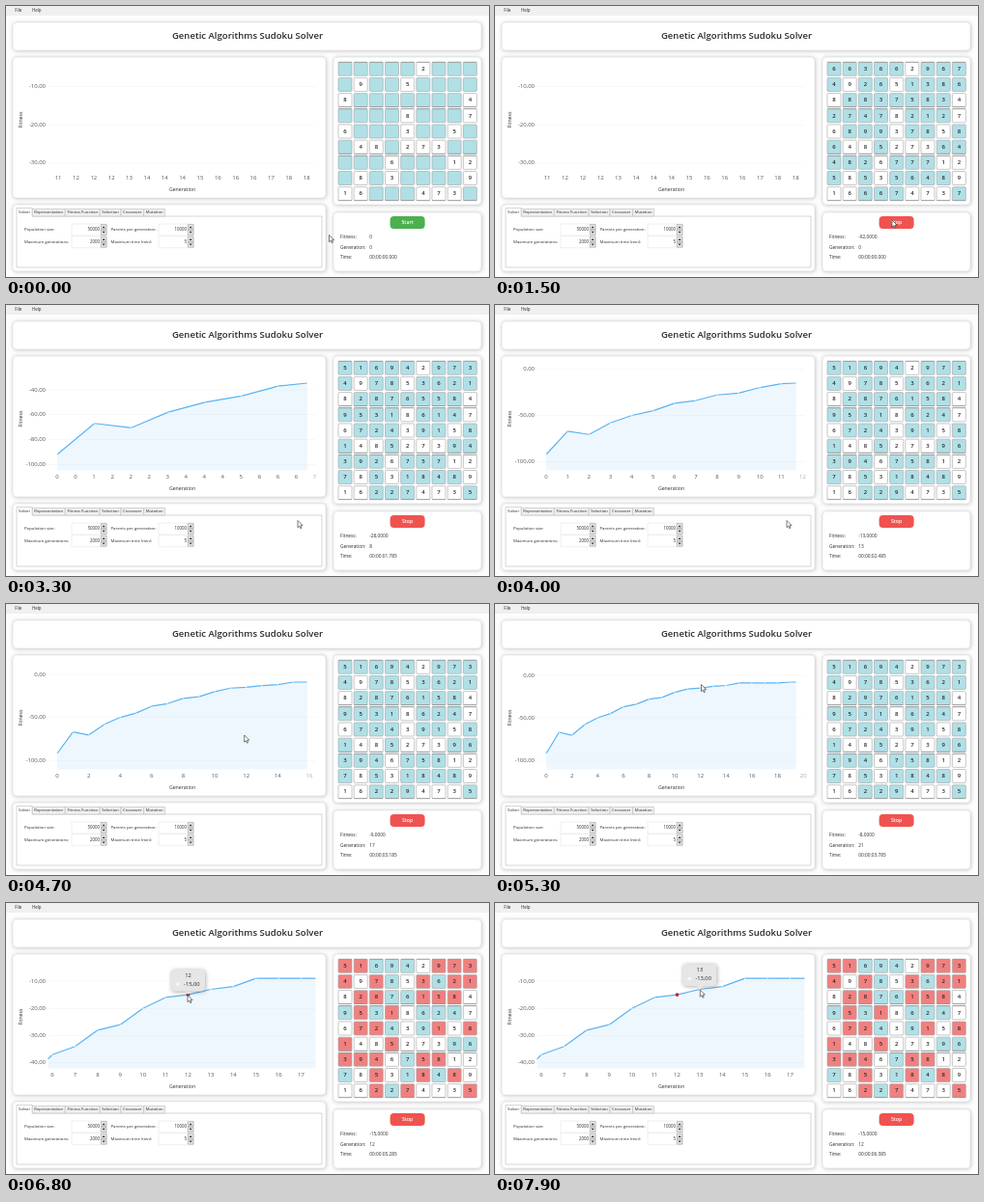
An HTML page with a canvas that plays this animation: 500 by 281 pixels, repeating every 8 s.

```html
<!DOCTYPE html>
<html lang="en">
<head>
<meta charset="utf-8">
<title>Sudoku solver</title>
<style>
html, body { margin: 0; width: 100%; height: 100%; overflow: hidden; background: #fff; }
canvas { display: block; width: 500px; height: 281px; }
</style>
</head>
<body>
<canvas id="stage"></canvas>
<script>
const LOOP = 8000, STEP = 100, START = 1500, PICK = 6400, PICKED = 12;
const canvas = document.getElementById('stage');
const ctx = canvas.getContext('2d');
const ratio = window.devicePixelRatio || 1;
canvas.width = 500 * ratio;
canvas.height = 281 * ratio;

const progress = (t, from, to) => Math.max(0, Math.min(1, (t - from) / (to - from)));
const mix = (a, b, p) => a.map((v, i) => v + (b[i] - v) * p);
const noise = n => { const v = Math.sin(n * 12.9898 + 4.1) * 43758.5453; return v - Math.floor(v); };
const comma = (v, digits) => v.toFixed(digits).replace('.', ',');

// Linear interpolation between rows of [time, ...values].
function track(keys, t) {
  const next = keys.findIndex(k => k[0] > t);
  if (next < 0) return keys[keys.length - 1].slice(1);
  const a = keys[Math.max(0, next - 1)], b = keys[next];
  return mix(a, b, progress(t, a[0], b[0])).slice(1);
}

const elapsed = t => Math.max(0, t - START - 15);
const generationAt = t => t >= PICK ? PICKED : Math.floor(4.4 * (elapsed(t) / 1000) ** 1.2);

function text(str, x, y, size, { align = 'left', color = '#2a2a2a', weight = 400 } = {}) {
  ctx.font = `${weight} ${size}px "Open Sans", "Noto Sans", sans-serif`;
  ctx.textAlign = align;
  ctx.textBaseline = 'middle';
  ctx.fillStyle = color;
  ctx.fillText(str, x, y);
}

function box(x, y, w, h, fill, { radius = 0, stroke, shadow } = {}) {
  ctx.save();
  ctx.beginPath();
  ctx.roundRect(x, y, w, h, radius);
  ctx.fillStyle = fill;
  if (shadow) {
    ctx.shadowColor = shadow;
    ctx.shadowBlur = 4 * ratio;
    ctx.shadowOffsetX = ctx.shadowOffsetY = 0.6 * ratio;
  }
  ctx.fill();
  ctx.restore();
  if (stroke) {
    ctx.strokeStyle = stroke;
    ctx.lineWidth = 0.6;
    ctx.stroke();
  }
}

function polygon(points, fill) {
  ctx.beginPath();
  points.forEach(([x, y]) => ctx.lineTo(x, y));
  if (!fill) return;
  ctx.closePath();
  ctx.fillStyle = fill;
  ctx.fill();
}

function dot(x, y, r, fill) {
  ctx.beginPath();
  ctx.arc(x, y, r, 0, 7);
  ctx.fillStyle = fill;
  ctx.fill();
}

function drawFrame() {
  box(0, 0, 500, 281, '#fdfdfd');
  box(0, 0, 500, 10, '#f0f0f0');
  text('File', 9.3, 5, 4.4);
  text('Help', 27, 5, 4.4);
  for (const [x, y, w, h] of [[7, 17, 485, 29], [7, 53, 324, 146], [7, 206, 324, 69], [339, 53, 153, 153], [339, 214, 153, 61]])
    box(x, y, w, h, '#fff', { radius: 4, stroke: '#e0e0e0', shadow: 'rgba(0,0,0,.25)' });
  text('Genetic Algorithms Sudoku Solver', 250, 32, 9.55, { align: 'center', weight: 600 });
}

function spinner(label, value, x, y, right) {
  text(label, x, y, 4.3);
  box(right - 29, y - 6, 36.5, 12, '#fff', { stroke: '#e4e4e4' });
  text(value, right, y, 4.4, { align: 'right' });
  for (const dir of [-1, 1]) {
    const cy = y + dir * 2.8;
    box(right + 1.3, cy - 2.6, 5.6, 5.2, '#e9e9e9', { stroke: '#999' });
    polygon([[right + 2.5, cy - dir], [right + 5.7, cy - dir], [right + 4.1, cy + dir]], '#333');
  }
}

function drawSettings() {
  box(11, 218, 316, 53, '#fff', { stroke: '#bbb' });
  let x = 11;
  ['Solver', 'Representation', 'Fitness Function', 'Selection', 'Crossover', 'Mutation'].forEach((name, i) => {
    ctx.font = '4.2px "Open Sans", "Noto Sans", sans-serif';
    const w = ctx.measureText(name).width + 4.2, top = i ? 210.5 : 209.5;
    box(x, top, w, 218 - top, i ? '#f0f0f0' : '#fff', { stroke: '#bbb' });
    if (!i) box(x + 0.4, 217, w - 0.8, 2, '#fff');
    text(name, x + w / 2, 214.3, 4.2, { align: 'center' });
    x += w;
  });
  spinner('Population size:', '50000', 19, 232, 97);
  spinner('Maximum generations:', '2000', 19, 244.7, 97);
  spinner('Parents per generation:', '10000', 108.5, 232, 187);
  spinner('Maximum time (min):', '5', 108.5, 244.7, 187);
}

const fitness = [-92, -67, -70.5, -58, -50, -45, -37, -34, -28, -26, -20, -16, -15, -13, -12, -9, -9, -9, -9, -8];
const fitnessAt = g => fitness[Math.min(g, fitness.length - 1)];
const heads = [[1600, 0], [2300, 2.25], [3300, 6.8], [4000, 11.7], [5300, 19.45], [6100, 26]];

function fitnessBetween(g) {
  const low = Math.floor(g), a = fitnessAt(low);
  return a + (fitnessAt(low + 1) - a) * (g - low);
}

// Visible window: first generation, generation count, top and bottom fitness.
function chartWindow(t, points) {
  if (t <= START) return [10.97, 7.19, -9.3, -28];
  const head = points[points.length - 1];
  const best = Math.max(-67, ...points.map(fitnessBetween));
  const live = [0, Math.max(1, head * 1.02), best, fitness[0]];
  const zoomed = mix([6.07, 11.55, -9.8, -37.2], [6.21, 11.28, -10, -36.2], progress(t, 6100, 6800));
  return mix(live, zoomed, progress(t, 5400, 5900));
}

function roundEven(v) {
  const low = Math.floor(v);
  return v - low === 0.5 ? low + low % 2 : Math.round(v);
}

function drawChart(t) {
  const [head] = track(heads, t);
  const points = Array.from({ length: Math.ceil(head) + 1 }, (_, g) => Math.min(g, head));
  const [first, count, top, bottom] = chartWindow(t, points);
  const unitX = 264 / count, unitY = 74 / (top - bottom);
  const px = g => 53 + (g - first) * unitX, py = v => 81 + (top - v) * unitY;

  const stepY = [10, 20, 50].find(s => s * unitY >= 25);
  for (let v = 0; v >= -150; v -= stepY) {
    const y = py(v);
    if (y < 64 || y > 171) continue;
    box(43.5, y - 0.25, 277, 0.5, '#f2f2f2');
    text(comma(v, 2), 41, y, 6, { align: 'right', color: '#555' });
  }
  const stepX = [0.25, 0.5, 1, 2].find(s => s * unitX >= 18) || 4;
  for (let g = 0; g <= 30; g += stepX) {
    const x = px(g);
    if (x < 43 || x > 322) continue;
    text(roundEven(g), x, 178.5, 6, { align: 'center', color: x > 312 ? '#aaa' : '#555' });
  }
  text('Generation', 182.5, 190.3, 5.2, { align: 'center' });
  ctx.save();
  ctx.translate(15.5, 118);
  ctx.rotate(-Math.PI / 2);
  text('Fitness', 0, 0, 5.2, { align: 'center' });
  ctx.restore();

  if (t <= START) return;
  // While the line is short, its points trail behind the shrinking scale.
  const trail = Math.max(0.5, 1 - 2.5 / head ** 3);
  const line = points.map(g => [px(head && head * (g / head) ** trail), py(fitnessBetween(g))]);
  ctx.save();
  ctx.beginPath();
  ctx.rect(43.5, 60, 277, 111.5);
  ctx.clip();
  polygon([[line[0][0], 172], ...line, [line[line.length - 1][0], 172]], 'rgba(33,150,243,.075)');
  polygon(line);
  ctx.strokeStyle = '#5bb3f3';
  ctx.lineWidth = 1.2;
  ctx.lineJoin = 'round';
  ctx.stroke();
  line.forEach(([x, y]) => dot(x, y, 0.7, '#e4f2fc'));
  if (t >= PICK) dot(px(PICKED), py(fitnessAt(PICKED)), 1.9, '#c62828');
  ctx.restore();

  if (t >= PICK) {
    const g = PICKED + progress(t, 7700, 7900);
    drawTooltip(px(g), py(fitnessBetween(g)), Math.round(g));
  }
}

function drawTooltip(x, y, g) {
  box(x - 17.5, y - 26, 35, 22.5, '#e6e6e6', { radius: 4, shadow: 'rgba(0,0,0,.35)' });
  polygon([[x - 3.5, y - 3.7], [x + 3.5, y - 3.7], [x, y - 0.3]], '#e6e6e6');
  text(g, x, y - 20, 5.8, { align: 'center' });
  dot(x - 10.5, y - 11, 1.8, '#f6f9fb');
  text(comma(fitnessAt(g), 2), x - 4.5, y - 11, 5.8);
}

const givens = '.....2....9..5....8.......4....8...76...3..5..48.273.....6...12.8.3....916...473.';
const evolved = '516942973497853621829761584953186247672439158148527396394675812785318469162294735';
const solution = solve(givens);

function solve(board) {
  const at = board.indexOf('.');
  if (at < 0) return board;
  const row = Math.floor(at / 9), col = at % 9;
  const corner = row - row % 3, side = col - col % 3;
  for (const digit of '123456789') {
    const clash = [...digit.repeat(9)].some((d, k) => d === board[row * 9 + k] || d === board[k * 9 + col]
      || d === board[(corner + Math.floor(k / 3)) * 9 + side + k % 3]);
    const result = !clash && solve(board.slice(0, at) + digit + board.slice(at + 1));
    if (result) return result;
  }
  return '';
}

// A cell keeps a random digit until the generation in which it settles.
function digitAt(i, t) {
  if (givens[i] !== '.') return givens[i];
  if (t < START) return '';
  const settles = -5 * Math.log(noise(i));
  return generationAt(t) > settles ? evolved[i] : String(1 + Math.floor(noise(i + 300) * 9));
}

function drawBoard(t) {
  const size = 14, pitch = 16.17;
  for (let i = 0; i < 81; i++) {
    const col = i % 9, row = Math.floor(i / 9), digit = digitAt(i, t);
    const x = 344 + col * pitch, y = 58.3 + row * pitch;
    const wrong = t >= PICK && digit !== solution[i];
    const color = givens[i] !== '.' ? '#fff' : wrong ? '#f08080' : '#b0e0e6';
    box(x, y, size, size, color, { radius: 1, stroke: '#a2a2a2' });
    ctx.fillStyle = '#8a8a8a';
    if (row % 3 === 0) ctx.fillRect(x, y - 0.4, size, 0.6);
    if (row % 3 === 2) ctx.fillRect(x, y + size - 0.2, size, 0.6);
    text(digit, x + size / 2, y + size / 2 + 0.2, 6, { align: 'center', weight: 600 });
  }
}

function drawStatus(t) {
  const running = t >= START;
  box(397.6, 218, 36, 13, running ? '#ef5350' : '#4caf50', { radius: 4 });
  text(running ? 'Stop' : 'Start', 415.6, 224.7, 5.2, { align: 'center', color: '#fff', weight: 600 });
  const gen = generationAt(t);
  const seconds = (elapsed(t) / 1000).toFixed(3).padStart(6, '0');
  [['Fitness:', running ? comma(fitnessAt(gen), 4) : '0'], ['Generation:', gen], ['Time:', '00:00:' + seconds]]
    .forEach(([label, value], i) => {
      const y = 240.2 + i * 10.3;
      text(label, 346, y, 4.8);
      text(value, 376.3, y, 4.8);
    });
}

const pointerPath = [[0, 334.5, 237.5], [800, 411, 222], [1600, 411, 222], [2100, 301.5, 233.5], [2400, 301.5, 233.5],
  [2900, 302, 223.5], [4200, 302, 223.5], [5000, 213.5, 83.5], [5500, 213.5, 83.5], [6000, 200.3, 97],
  [6300, 188, 95.5], [7700, 188, 95.5], [7900, 212.3, 90]];

function drawPointer(t) {
  const [x, y] = track(pointerPath, t);
  const arrow = [[0, 0], [0, 7.2], [1.7, 5.7], [2.8, 8.2], [3.9, 7.7], [2.9, 5.2], [5.1, 5.1]];
  polygon(arrow.map(([a, b]) => [x + a, y + b]), '#fff');
  ctx.strokeStyle = '#222';
  ctx.lineWidth = 0.6;
  ctx.stroke();
}

function draw(t) {
  ctx.setTransform(ratio, 0, 0, ratio, 0, 0);
  drawFrame();
  drawSettings();
  drawChart(t);
  drawBoard(t);
  drawStatus(t);
  drawPointer(t);
}

let shown = -1;
function tick() {
  const t = Math.floor(performance.now() % LOOP / STEP) * STEP;
  if (t !== shown) draw(shown = t);
  requestAnimationFrame(tick);
}
tick();
</script>
</body>
</html>
```
